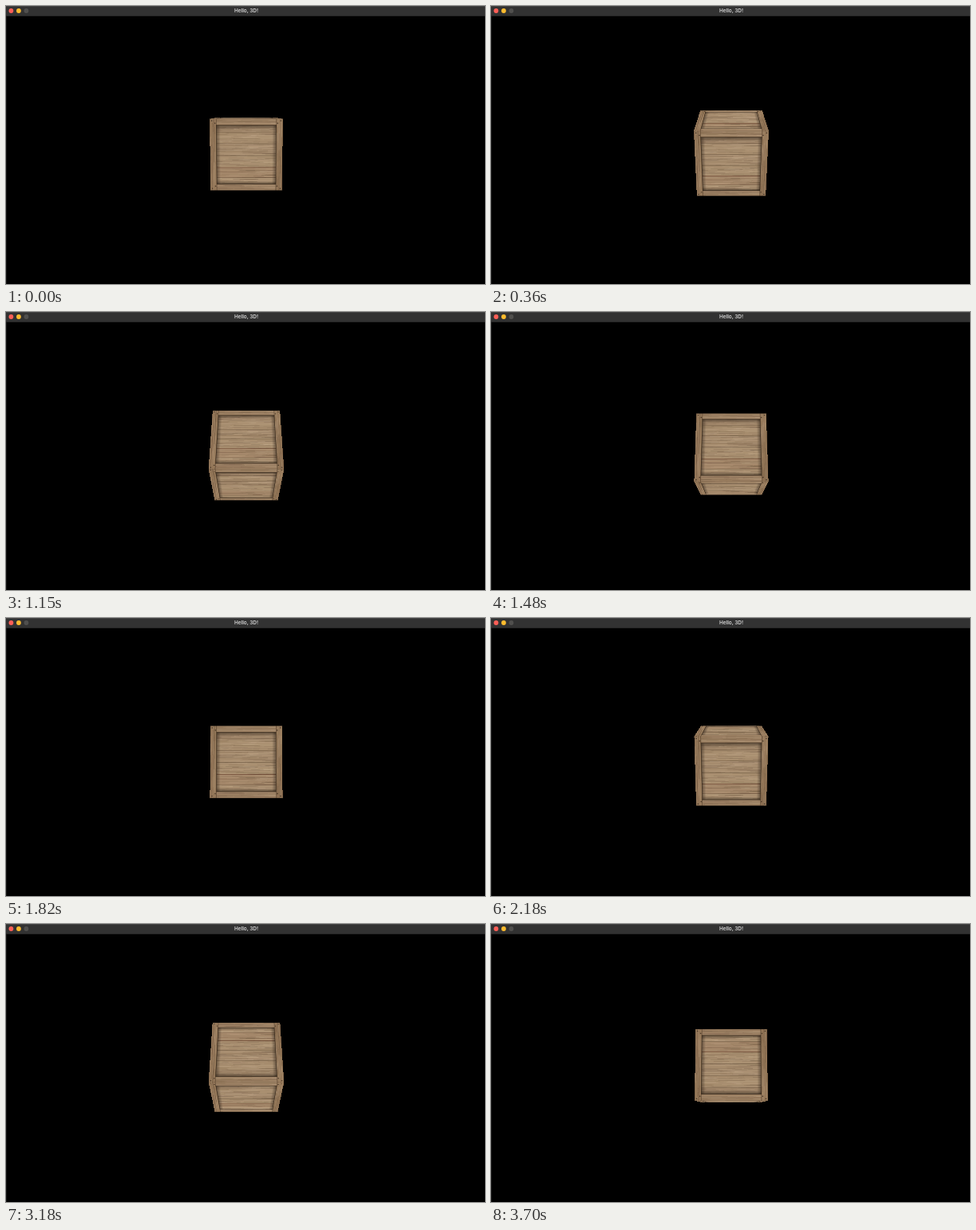
Write an HTML page with a canvas that moves like this. It is 600x349 px and loops after 3.73 s.

```html
<!DOCTYPE html>
<html lang="en">
<head>
<meta charset="utf-8">
<title>Hello, 3D!</title>
<style>
  html, body { margin: 0; width: 100%; height: 100%; overflow: hidden; background: #000; }
  #stage { position: relative; width: 600px; height: 349px; overflow: hidden; background: #000; }
  canvas, svg { position: absolute; left: 0; top: 0; }
  text { font: 600 6.4px Inter, sans-serif; fill: #d6d6d6; text-anchor: middle; }
</style>
</head>
<body>
<div id="stage">
  <canvas id="view" width="600" height="349"></canvas>
  <svg width="600" height="349">
    <rect y="13" width="1" height="336" fill="#181818"/>
    <rect width="600" height="12.7" fill="#323232"/>
    <rect width="600" height="1" fill="#444"/>
    <circle cx="6.4" cy="6" r="2.9" fill="#fe5f57"/>
    <circle cx="15.9" cy="6" r="2.9" fill="#febc2e"/>
    <circle cx="25.4" cy="6" r="2.9" fill="#504f4d"/>
    <text x="301" y="8.3">Hello, 3D!</text>
  </svg>
</div>
<script>
const LOOP = 3730, STEP = 30.32;        // ms
const START = 6.5, SPEED = 0.045;       // degrees, degrees per ms
const CX = 301, CY = 181.9;             // projection centre
const FOCAL = 408.5, DIST = 10;         // camera, in half cube edges
const SIZE = 180;                       // crate texture

const g = document.getElementById('view').getContext('2d');

function randomizer(seed) {
  return () => (seed = (seed * 16807) % 2147483647) / 2147483647;
}

function makeCrate() {
  const tex = document.createElement('canvas');
  tex.width = tex.height = SIZE;
  const c = tex.getContext('2d');
  const rnd = randomizer(4127);
  const rect = (color, x, y, w, h) => { c.fillStyle = color; c.fillRect(x, y, w, h); };

  // Streaks of grain along one direction, clipped to a board
  function board(x, y, w, h, color, upright) {
    c.save();
    c.beginPath();
    c.rect(x, y, w, h);
    c.clip();
    rect(color, x, y, w, h);
    const across = upright ? w : h, along = upright ? h : w;
    for (let i = 0; i < across * 3; i++) {
      const p = rnd() * across, q = (rnd() * 1.4 - 0.4) * along;
      const len = along * (0.15 + rnd() * 0.6), thick = 0.6 + rnd() * 1.1;
      const a = 0.06 + rnd() * 0.17;
      const tone = rnd() < 0.5 ? `rgba(72,52,36,${a})` : `rgba(216,194,166,${a})`;
      if (upright) rect(tone, x + p, y + q, thick, len);
      else rect(tone, x + q, y + p, len, thick);
    }
    c.restore();
  }

  const rim = 16, far = SIZE - rim, inner = SIZE - 2 * rim;

  // Planks
  const cuts = [rim, 33, 62, 92, 122, 148, far];
  const woods = ['#a1876a', '#a98f70', '#a78d6f', '#aa9071', '#a5886a', '#a88e6f'];
  woods.forEach((wood, i) => board(rim, cuts[i], inner, cuts[i + 1] - cuts[i], wood));
  cuts.slice(1, -1).forEach((y, i) => {
    rect(i === 3 ? 'rgba(96,56,36,.65)' : 'rgba(70,50,34,.4)', rim, y - 1, inner, 1.7);
    rect('rgba(222,200,170,.2)', rim, y + 1, inner, 1.2);
  });

  // Shadow the frame casts on the planks
  const shade = (x0, y0, x1, y1, a) => {
    const s = c.createLinearGradient(x0, y0, x1, y1);
    s.addColorStop(0, `rgba(38,27,18,${a})`);
    s.addColorStop(1, 'rgba(38,27,18,0)');
    c.fillStyle = s;
    c.fillRect(rim, rim, inner, inner);
  };
  shade(0, rim, 0, rim + 10, 0.6);
  shade(0, far, 0, far - 8, 0.6);
  shade(rim, 0, rim + 10, 0, 0.5);
  shade(far, 0, far - 10, 0, 0.5);

  // Frame
  board(0, 0, SIZE, rim, '#9d8163');
  board(0, far, SIZE, rim, '#9d8163');
  board(0, 0, rim, SIZE, '#957859', true);
  board(far, 0, rim, SIZE, '#957859', true);
  c.strokeStyle = 'rgba(48,34,22,.6)';
  c.lineWidth = 1.8;
  c.strokeRect(rim, rim, inner, inner);
  c.strokeStyle = 'rgba(70,50,34,.3)';
  c.lineWidth = 1.4;
  c.strokeRect(0.5, 0.5, SIZE - 1, SIZE - 1);
  for (const x of [rim, far])
    for (const y of [0, far]) rect('rgba(54,38,24,.45)', x - 0.8, y, 1.6, rim);

  // Nails, two in each corner
  c.fillStyle = 'rgba(48,34,22,.75)';
  for (const [a, b] of [[5, 5], [13, 11]])
    for (const x of [a, SIZE - a])
      for (const y of [b, SIZE - b]) {
        c.beginPath();
        c.arc(x, y, 1.6, 0, 7);
        c.fill();
      }
  return tex;
}

function flipped(src) {
  const tex = document.createElement('canvas');
  tex.width = tex.height = SIZE;
  const c = tex.getContext('2d');
  c.scale(1, -1);
  c.drawImage(src, 0, -SIZE);
  return tex;
}

const crate = makeCrate();
const faces = [crate, crate, flipped(crate)];

// Every edge across the face stays level, so each pixel row shows one texture row
function drawFace(tex, degrees) {
  const a = degrees * Math.PI / 180, c = Math.cos(a), s = Math.sin(a);
  const y0 = c - s, z0 = c + s;               // upper edge
  const dy = -2 * c, dz = -2 * s;             // towards the lower edge
  const screenY = v => CY - FOCAL * (y0 + v * dy) / (DIST - z0 - v * dz);
  const top = screenY(0), bottom = screenY(1);
  if (bottom <= top) return;
  const rowAt = y => {
    const k = (y - CY) / FOCAL;
    return Math.min(1, Math.max(0, -(y0 + k * (DIST - z0)) / (dy - k * dz)));
  };
  for (let y = Math.floor(top); y < bottom; y++) {
    const from = Math.max(y, top), to = Math.min(y + 1, bottom);
    const v0 = rowAt(from), v1 = rowAt(to);
    const half = FOCAL / (DIST - z0 - (v0 + v1) / 2 * dz);
    const h = Math.max(1, (v1 - v0) * SIZE);
    const sy = Math.min(SIZE - h, v0 * SIZE);
    g.globalAlpha = to - from;
    g.drawImage(tex, 0, sy, SIZE, h, CX - half, y, 2 * half, 1);
  }
  g.globalAlpha = 1;
}

function draw(ms) {
  const time = Math.floor((ms % LOOP + 4.99) / STEP) * STEP;
  const angle = START + SPEED * time;
  g.clearRect(0, 0, 600, 349);
  g.globalCompositeOperation = 'lighter';     // shared edge rows add up to full cover
  faces.forEach((tex, i) => drawFace(tex, angle - 90 * i));
  g.globalCompositeOperation = 'source-over';
}

const begin = performance.now();
function tick() {
  draw(performance.now() - begin);
  requestAnimationFrame(tick);
}
tick();
</script>
</body>
</html>
```
